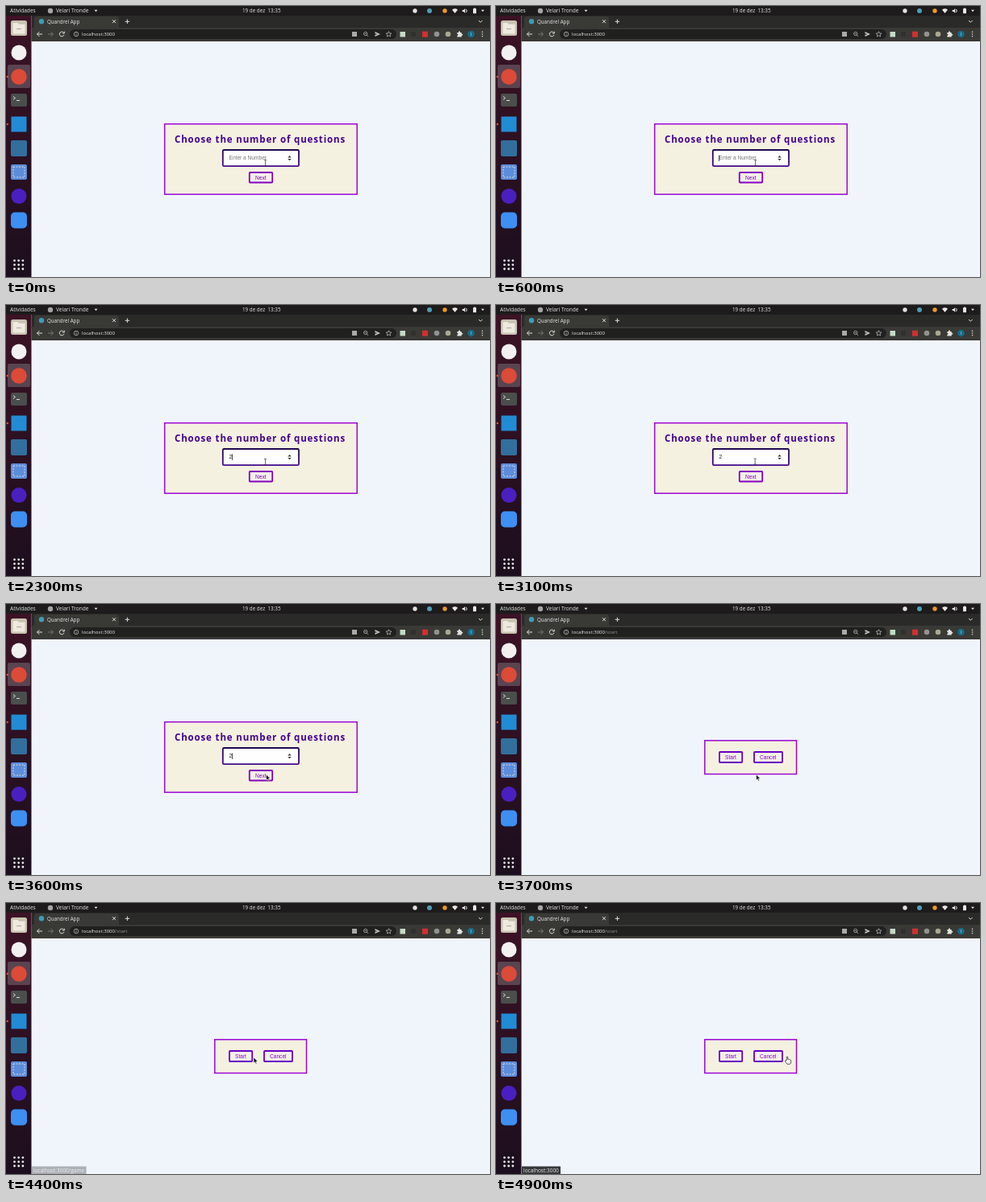
Write an HTML page that moves like this. It is 600 px wide and 337 px high and loops after 5 s.

```html
<!DOCTYPE html>
<html lang="en">
<head>
<meta charset="utf-8">
<title>Quandrel App</title>
<style>
  html, body { margin: 0; width: 100%; height: 100%; overflow: hidden; background: #f0f5fc; }
  svg { display: block; width: 600px; height: 337px; }
  text { font-family: "Open Sans", "Noto Sans", sans-serif; fill: #e8e8e6; white-space: pre; }
  .form { font-family: "Liberation Sans", Arial, sans-serif; font-size: 6.6px; }
  .bar { font-size: 6.6px; }
  .line { fill: none; stroke: #dededc; stroke-width: 1; }
  .card { fill: #f5f1e1; stroke: #9c06d4; stroke-width: 1.5; }
  .btn { fill: #f5f0ea; stroke-width: 1.8; }
  .title { font-size: 11.5px; font-weight: 700; letter-spacing: .85px; fill: #420090; }
  .next { fill: #7c00b4; }
  .choice { fill: #8800c8; }
</style>
</head>
<body>
<svg viewBox="0 0 600 337">
  <defs>
    <linearGradient id="dock" x2="0" y2="1">
      <stop offset="0" stop-color="#3c1325"/>
      <stop offset="1" stop-color="#1c0e1e"/>
    </linearGradient>
    <linearGradient id="focus" x2="0" y2="1">
      <stop offset="0" stop-color="#1f0850"/>
      <stop offset="1" stop-color="#43088a"/>
    </linearGradient>
  </defs>

  <!-- browser window -->
  <rect x="31.500" y="11" width="568.500" height="17" fill="#2a2a28"/>
  <path d="M33 28q2 0 2-2v-10q0-3 3-3h99q3 0 3 3v10q0 2 2 2z" fill="#393936"/>
  <rect x="31.500" y="27" width="568.500" height="17" fill="#393936"/>
  <rect x="79" y="29" width="405" height="12" rx="6" fill="#20211f"/>
  <circle cx="44" cy="19.300" r="3.200" fill="#3e9cb5"/>
  <text x="51" y="21.700" font-size="6.2">Quandrel App</text>
  <g class="line">
    <path d="M132 17.200l4 4m0-4l-4 4M147.700 19.300h5.400m-2.700-2.700v5.400M586 18l2.300 2.300 2.300-2.300"/>
    <path d="M45 35h-6.500m2.900-2.900l-2.900 2.900 2.900 2.900"/>
    <path d="M52 35h6.500m-2.900-2.900l2.900 2.900-2.900 2.900" stroke="#777774"/>
    <path d="M71.600 33.300a2.900 2.900 0 1 0 .4 2.500M72.300 31.700v2.300h-2.300"/>
    <g stroke="#b5b5b2" stroke-width=".8">
      <circle cx="87" cy="35" r="2.800"/><path d="M87 34.600v2M87 33v.8"/>
      <circle cx="445.700" cy="34.500" r="2.200"/><path d="M447.300 36.200l1.800 1.800M444.700 34.500h2"/>
      <path d="M474.500 31.700l1 2.200 2.400.2-1.800 1.600.5 2.300-2.100-1.200-2.100 1.200.5-2.300-1.800-1.600 2.400-.2z"/>
    </g>
  </g>
  <rect x="429" y="32" width="6" height="6" fill="#aaaaa8"/>
  <path d="M457.500 32l6.500 3-6.500 3v-2.300l3.500-.7-3.500-.7z" fill="#c8c8c5"/>
  <text x="94" y="37.300" font-size="6.1">localhost:3000<tspan id="path" fill="#969692"></tspan></text>
  <rect x="488.500" y="32" width="6.500" height="6.500" fill="#c5dbc7"/>
  <rect x="502" y="32" width="6" height="6" fill="#30302e"/>
  <rect x="516" y="31.700" width="7" height="7" fill="#d32f2f"/>
  <circle cx="534" cy="35" r="3.300" fill="#92928f"/>
  <circle cx="548" cy="35" r="3.300" fill="#aaa793"/>
  <path d="M559.300 33h1.700q-.2-1.700 1-1.700t1 1.700h1.700v1.700q1.600-.2 1.600 1t-1.600 1v1.700h-5.400v-1.700q1.200-.2 1.200-1t-1.200-1z" fill="#e2e2df"/>
  <circle cx="576.500" cy="35" r="4.300" fill="#176c8b"/>
  <text x="575.700" y="37" font-size="5.5">I</text>
  <g fill="#dededc"><circle cx="590.500" cy="32.300" r=".8"/><circle cx="590.500" cy="35" r=".8"/><circle cx="590.500" cy="37.700" r=".8"/></g>

  <!-- system bar -->
  <rect width="600" height="12" fill="#1d1b1c"/>
  <g class="bar">
    <text x="5" y="8.300">Atividades</text>
    <text x="62" y="8.300">Velari Tronde</text>
    <text x="293" y="8.300" font-size="6.3">19 de dez&#160; 13:35</text>
  </g>
  <circle cx="55" cy="6" r="3.200" fill="#a5a5a3"/>
  <path d="M109.500 4.800h4l-2 2.500zM589 4.800h4l-2 2.500z" fill="#dededc"/>
  <circle cx="507" cy="6" r="2.700" fill="#e2e2e0"/>
  <circle cx="525" cy="6" r="3" fill="#4c9eb8"/>
  <circle cx="544" cy="6" r="2.700" fill="#f29a24"/>
  <path d="M553 4.700q3.500-2.700 7 0l-3.500 4.300z" fill="#e8e8e6"/>
  <path d="M565.700 5h1.500l2-2v6l-2-2h-1.500z" fill="#e8e8e6"/>
  <path d="M570.500 4q1.500 2 0 4" class="line"/>
  <path d="M579 3.300h1.200v-.8h1.600v.8h1.200v6h-4z" fill="#e8e8e6"/>

  <!-- dock -->
  <rect y="12" width="31.500" height="325" fill="url(#dock)"/>
  <rect x="2" y="73" width="28" height="29" rx="2" fill="#594450"/>
  <g fill="#e95420"><circle cx="1.800" cy="88" r="1.200"/><circle cx="1.800" cy="147" r="1.200"/></g>
  <rect x="6" y="18" width="20" height="19" rx="2.500" fill="#c9c3b3"/>
  <path d="M8.500 21h6l1.500 1.800h7.500v11.700h-15z" fill="#eeeadf"/>
  <path d="M13 28.500h6" stroke="#b5afa2" stroke-width="1.200"/>
  <circle cx="16" cy="58" r="9.500" fill="#f3f0f2"/>
  <circle cx="16" cy="88" r="9.800" fill="#dc4a38"/>
  <rect x="6" y="109" width="20" height="16" rx="2" fill="#4a4e4d"/>
  <path d="M9 112.500l2.500 2-2.500 2M13 117.500h4" class="line"/>
  <rect x="6.500" y="137.500" width="19" height="19" fill="#218cd4"/>
  <rect x="6" y="167" width="20" height="20" rx="2" fill="#326f9c"/>
  <rect x="6" y="197" width="20" height="19" rx="2" fill="#5c8ddb"/>
  <rect x="9" y="200" width="14" height="13" class="line" stroke-dasharray="2 1.500"/>
  <circle cx="16" cy="236.500" r="9.500" fill="#4a1fc0"/>
  <rect x="6" y="256.500" width="20" height="20" rx="5" fill="#3d8ff2"/>
  <g id="grid" fill="#efecee"></g>

  <!-- pages -->
  <g id="choose">
    <rect class="card" x="196.700" y="146.700" width="238.500" height="87.500"/>
    <text class="title" x="209" y="170">Choose the number of questions</text>
    <rect x="268.800" y="179" width="94.200" height="20.200" rx="1.500" fill="#fefefe" stroke="url(#focus)" stroke-width="1.800"/>
    <text id="value" class="form" x="276.500" y="191.300"></text>
    <path id="caret" d="M0 185.500v7.500" stroke="#222" stroke-width=".8"/>
    <path d="M349.300 188.400h4.400l-2.200-2.300zM349.300 190h4.400l-2.200 2.300z" fill="#383838"/>
    <rect class="btn" x="301.800" y="207" width="28.400" height="12.500" rx=".8" stroke="#8300bd"/>
    <text class="form next" x="309" y="215.600">Next</text>
  </g>
  <g id="start">
    <rect class="card" x="258.800" y="169.800" width="113.700" height="41.700"/>
    <g class="btn" stroke="#6500c4">
      <rect x="277" y="184" width="28.200" height="13" rx=".8"/>
      <rect x="320" y="184" width="35" height="13" rx=".8"/>
    </g>
    <text class="form choice" x="284" y="192.800">Start</text>
    <text class="form choice" x="327" y="192.800">Cancel</text>
  </g>

  <g id="status">
    <rect id="tip" x="32" y="327.500" height="10" fill="#36383a"/>
    <text id="link" x="34" y="334.700" font-size="6.5"></text>
  </g>

  <!-- pointers, hot spot at 0,0 -->
  <g id="pointer">
    <path id="beam" d="M-1.500-3.500h1q.5 0 .5.500v6q0 .5-.5.500h-1M1.500-3.500h-1q-.5 0-.5.500M1.500 3.500h-1q-.5 0-.5-.5" fill="none" stroke="#444" stroke-width=".8"/>
    <path id="arrow" d="M0 0v7l1.600-1.400 1.100 2.400 1.200-.6-1-2.300h2.200z" fill="#161616" stroke="#fff" stroke-width=".5"/>
    <path id="hand" d="M-.7 4.500v-4q0-.8.700-.8t.7.800v2.500q1-.6 1.400.3 1-.4 1.400.5 1.200-.2 1.200.9v1.500q0 2-1.200 2.800h-3.500l-2.500-3.300q-.4-.9.400-1.200z" fill="#fff" stroke="#222" stroke-width=".75"/>
  </g>
</svg>
<script>
const LOOP = 5000;
const $ = id => document.getElementById(id);
const show = (id, on) => { $(id).style.display = on ? "" : "none"; };

// each row: start time, then the state held until the next row
const pointer = [
  [0, "beam", 321.5, 195], [3100, "beam", 321.2, 194.5], [3200, "beam", 321.3, 197],
  [3300, "arrow", 322, 204], [3400, "arrow", 322, 209], [3500, "arrow", 322.5, 212],
  [3900, "arrow", 321, 211], [4100, "arrow", 312, 203], [4200, "hand", 300, 193],
  [4300, "hand", 301, 192], [4400, "arrow", 307, 192], [4500, "hand", 333, 193],
  [4600, "hand", 365.5, 196], [4900, "hand", 361, 191.3]
];
const carets = [
  [0, false], [100, true], [700, false], [1300, true], [1900, false],
  [2000, true], [2600, false], [3200, true]
];
const links = [
  [0, "", 0, 0], [4200, "localhost:3000/game", 67.5, 1],
  [4400, "localhost:3000/game", 67.5, 0.36], [4500, "localhost:3000", 48, 1]
];
const TYPED = 2000, NEXT = 3700;

const at = (rows, t) => rows.findLast(row => row[0] <= t).slice(1);

for (let i = 0; i < 9; i++) {
  const dot = document.createElementNS("http://www.w3.org/2000/svg", "circle");
  dot.setAttribute("cx", 10.5 + i % 3 * 5.2);
  dot.setAttribute("cy", 316.6 + Math.floor(i / 3) * 5.2);
  dot.setAttribute("r", 1.4);
  $("grid").append(dot);
}

function draw(t) {
  const typed = t >= TYPED, next = t >= NEXT;
  show("choose", !next);
  show("start", next);
  $("path").textContent = next ? "/start" : "";
  $("value").textContent = typed ? "2" : "Enter a Number";
  $("value").style.fill = typed ? "#222" : "#777";
  $("caret").setAttribute("transform", `translate(${typed ? 280.5 : 276.5} 0)`);
  show("caret", at(carets, t)[0]);

  const [label, width, alpha] = at(links, t);
  $("link").textContent = label;
  $("tip").setAttribute("width", width);
  $("status").style.opacity = alpha;

  const [kind, x, y] = at(pointer, t);
  for (const id of ["beam", "arrow", "hand"]) show(id, id === kind);
  $("pointer").setAttribute("transform", `translate(${x} ${y})`);
}

const begin = performance.now();
function tick() {
  draw((performance.now() - begin) % LOOP);
  requestAnimationFrame(tick);
}
tick();
</script>
</body>
</html>
```
